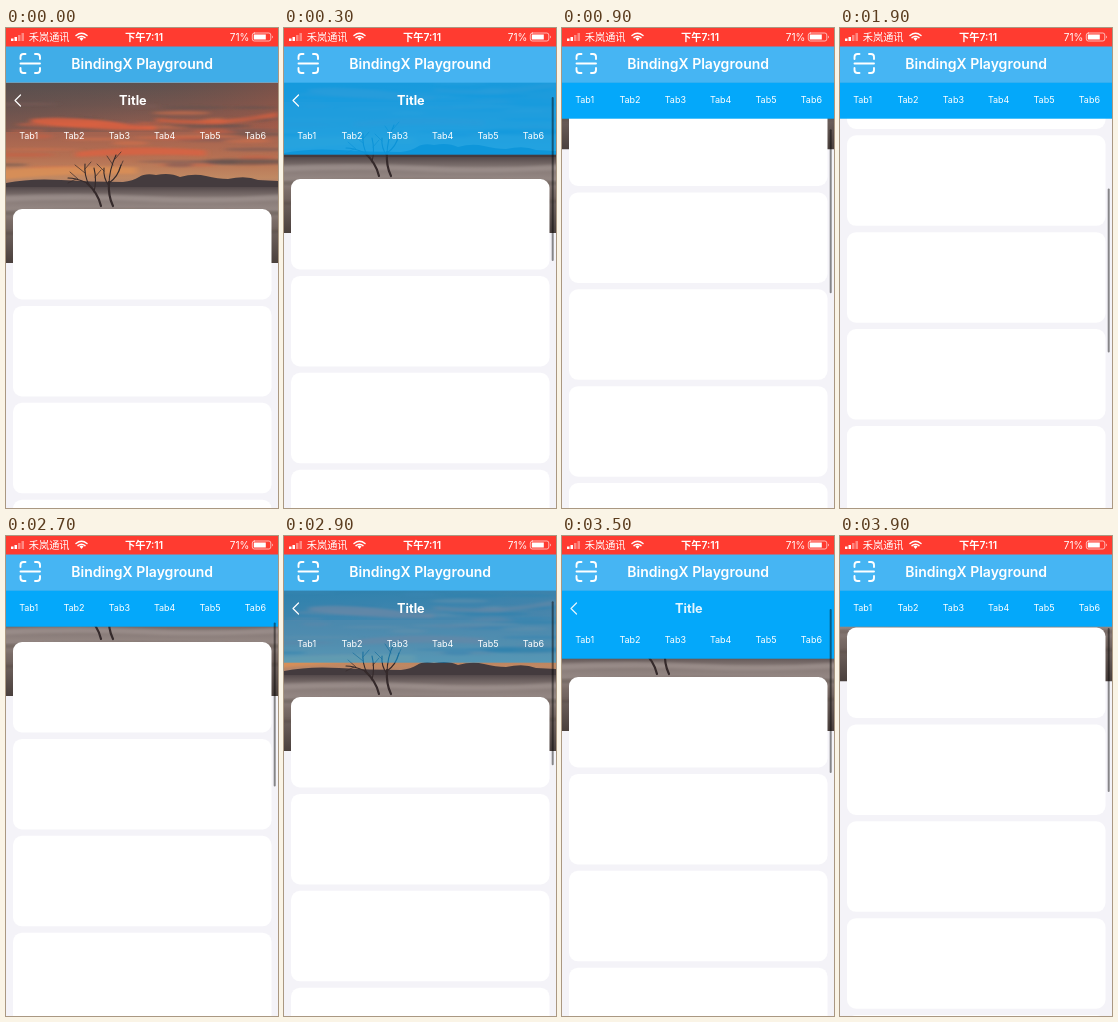
Animation, 272 px wide and 480 px high, one loop 4.1 s. Source, as an HTML page:

```html
<!DOCTYPE html>
<html lang="zh">
<head>
<meta charset="utf-8">
<title>Collapsing tab header</title>
<style>
  html, body { margin: 0; width: 100%; height: 100%; overflow: hidden; background: #f4f3f8; }
  svg { display: block; width: 272px; height: 480px; }
  text { font-family: Inter, "Noto Sans CJK SC", "Noto Sans CJK", sans-serif; fill: #fff; }
  .line { fill: none; stroke: #fff; stroke-linecap: round; stroke-linejoin: round; }
  .mid { text-anchor: middle; }
</style>
</head>
<body>
<svg viewBox="0 0 272 480">
  <defs>
    <linearGradient id="sky" x2="0" y2="1">
      <stop offset="0" stop-color="#5f524f"/>
      <stop offset=".22" stop-color="#78574f"/>
      <stop offset=".45" stop-color="#a0614f"/>
      <stop offset=".7" stop-color="#b56f52"/>
      <stop offset=".9" stop-color="#c08862"/>
      <stop offset="1" stop-color="#a98070"/>
    </linearGradient>
    <linearGradient id="ground" x2="0" y2="1">
      <stop offset="0" stop-color="#54494a"/>
      <stop offset=".14" stop-color="#857875"/>
      <stop offset=".3" stop-color="#958884"/>
      <stop offset=".45" stop-color="#7a6c67"/>
      <stop offset="1" stop-color="#4a403d"/>
    </linearGradient>
    <linearGradient id="dusk">
      <stop offset="0" stop-color="#4b4a4d" stop-opacity=".4"/>
      <stop offset=".5" stop-color="#4b4a4d" stop-opacity=".15"/>
      <stop offset="1" stop-color="#b0523c" stop-opacity=".3"/>
    </linearGradient>
    <filter id="soft"><feGaussianBlur stdDeviation="3 1"/></filter>
    <clipPath id="photo"><path d="M0 54.500h272V235H0z"/></clipPath>
  </defs>

  <g id="content">
    <g clip-path="url(#photo)">
      <path d="M0 54h272v106H0z" fill="url(#sky)"/>
      <path d="M0 54h272v50H0z" fill="url(#dusk)"/>
      <g id="clouds" filter="url(#soft)"></g>
      <g filter="url(#soft)" fill="#e2613f">
        <path d="M25 91q50-4 100 6l25 1v4q-60 1-125-7z" opacity=".8"/>
        <path d="M150 90q60 6 122-6v5q-60 11-122 5z" opacity=".6"/>
        <path d="M70 124q60-8 130-2v6q-60-3-130 1z" opacity=".7"/>
        <path d="M-9 142q60-5 140-3v7q-80-1-140 6z" fill="#dd9055" opacity=".8"/>
      </g>
      <path d="M0 155q25-5 55-3t62 2q10-1 16-5t17-2q14-3 24 2 14-4 26-1t22 3q18-4 30 1l20 1v13H0z" fill="#443b3e"/>
      <path d="M0 159h272v76H0z" fill="url(#ground)"/>
      <g filter="url(#soft)">
        <path d="M-9 168q80-4 150 0t140-2v6q-90 4-150 1T-9 174z" fill="#aa9d99" opacity=".5"/>
        <path d="M-9 183q120-4 290 0v4q-140 4-290 0zM-9 203q120 4 290-2v4q-140 5-290 2z" fill="#4e423f" opacity=".35"/>
      </g>
      <g fill="none" stroke="#352a2b" stroke-linecap="round">
        <path d="M107 178q-5-10-4-24M95 178q-3-13-14-23" stroke-width="2.200"/>
        <path d="M103 157q0-15 7-30M103 158q-6-8-5-18M103 155q9-6 12-18M81 155q-11-5-19-5M83 157q-5-10-4-21M88 164q3-12 0-24" stroke-width="1.100"/>
        <path d="M107 137l-6-9M109 131l6-7M98 143l-7-7M113 142l4-9M72 151l-8-7M79 145l-10-8M79 141l6-7M89 149l6-7M70 151l-8 4" stroke-width=".7"/>
      </g>
    </g>
    <g id="cards" fill="#fff"></g>
  </g>

  <rect id="bar" y="54" width="272" fill="#04a8fa"/>
  <g id="title">
    <path class="line" stroke-width="1.200" d="M14.500 67L9 72.500l5.500 5.500"/>
    <text class="mid" x="126.900" y="77" font-size="12.700" font-weight="700">Title</text>
  </g>
  <g id="tabs" class="mid" font-size="9"></g>

  <path d="M0 18h272v36.500H0z" fill="#40ade8"/>
  <path id="tint" d="M0 18h272v36.500H0z" fill="#46b5f3"/>
  <path class="line" stroke-width="1.900" d="M14.500 31v-2q0-3 3-3h2M29 26h2q3 0 3 3v2M34 40v2q0 3-3 3h-2M19.500 45h-2q-3 0-3-3v-2M14.500 35.500h19.500"/>
  <text class="mid" x="136.200" y="41" font-size="14" font-weight="600">BindingX Playground</text>

  <path d="M0 0h272v18.500H0z" fill="#ff3b30"/>
  <g fill="#fff">
    <path d="M5 10.500h2.500v2.500H5zM8.500 9H11v4H8.500z"/>
    <path d="M12 7h2.500v6H12zM15.500 5H18v8h-2.500z" opacity=".4"/>
    <path d="M73.500 10.500q2-1.800 4 0l-2 2.500z"/>
  </g>
  <path class="line" stroke-width="1.500" d="M70 7.500q5.500-4.500 11 0M72 9.600q3.500-2.800 7 0"/>
  <text x="22.800" y="13" font-size="10.200">禾岚通讯</text>
  <text class="mid" x="138" y="13" font-size="10.300" font-weight="600">下午7:11</text>
  <text x="223.800" y="12.700" font-size="10">71%</text>
  <rect class="line" x="246.300" y="5" width="18.500" height="8" rx="2" stroke-width=".8" opacity=".8"/>
  <path d="M247.800 6.500h12v5h-12zM266 7.500q1.500 1.500 0 3z" fill="#fff"/>

  <rect id="thumb" x="267.700" width="2" rx="1" fill="#000" opacity=".45"/>
</svg>
<script>
  const $ = id => document.getElementById(id);
  const set = (id, attrs) => {
    for (const name in attrs) $(id).setAttribute(name, attrs[name]);
  };
  const clamp = (v, lo, hi) => Math.min(hi, Math.max(lo, v));

  const LOOP = 4100, STEP = 200, FOLD = 36;
  const scroll = [0, 9, 30, 51, 77, 113.500, 145, 177, 207, 243, 267.500,
    282, 248, 147, 75, 20, -4.500, 3, 40, 68, 89.500];

  let seed = 7;
  const random = () => (seed = seed * 16807 % 2147483647) / 2147483647;
  const cloudColors = ['#64524f', '#c75f45', '#7b5d58', '#d2714c'];
  for (let i = 0; i < 44; i++)
    $('clouds').innerHTML += `<ellipse cx="${random() * 272}" cy="${76 + random() * 66}" rx="${14 + random() * 30}"
      ry="${1 + random() * 1.5}" fill="${cloudColors[i % 4]}" opacity=".6"/>`;
  for (let i = 0; i < 7; i++)
    $('cards').innerHTML += `<rect x="7" y="${181 + i * 96.9}" width="258.500" height="90.500" rx="9"/>`;
  for (let i = 0; i < 6; i++)
    $('tabs').innerHTML += `<text x="${(i + .5) * 272 / 6}" y="111.200">Tab${i + 1}</text>`;

  function draw(now) {
    const step = Math.floor((now % LOOP + STEP / 2) / STEP);
    const y = scroll[step];
    const blue = clamp(y / FOLD, 0, 1);
    const fold = clamp(y - FOLD, 0, FOLD);
    const top = 57.5 + .385 * Math.max(y, 0);

    set('content', { transform: `translate(0 ${-y})` });
    set('bar', { height: 2 * FOLD + .7 - fold, opacity: blue });
    set('tint', { opacity: blue });
    set('title', { opacity: 1 - fold / FOLD });
    set('tabs', { transform: `translate(0 ${-fold})` });
    set('thumb', { y: top, height: 164 + Math.min(y, 0), visibility: step ? 'visible' : 'hidden' });
    requestAnimationFrame(draw);
  }
  draw(0);
</script>
</body>
</html>
```
